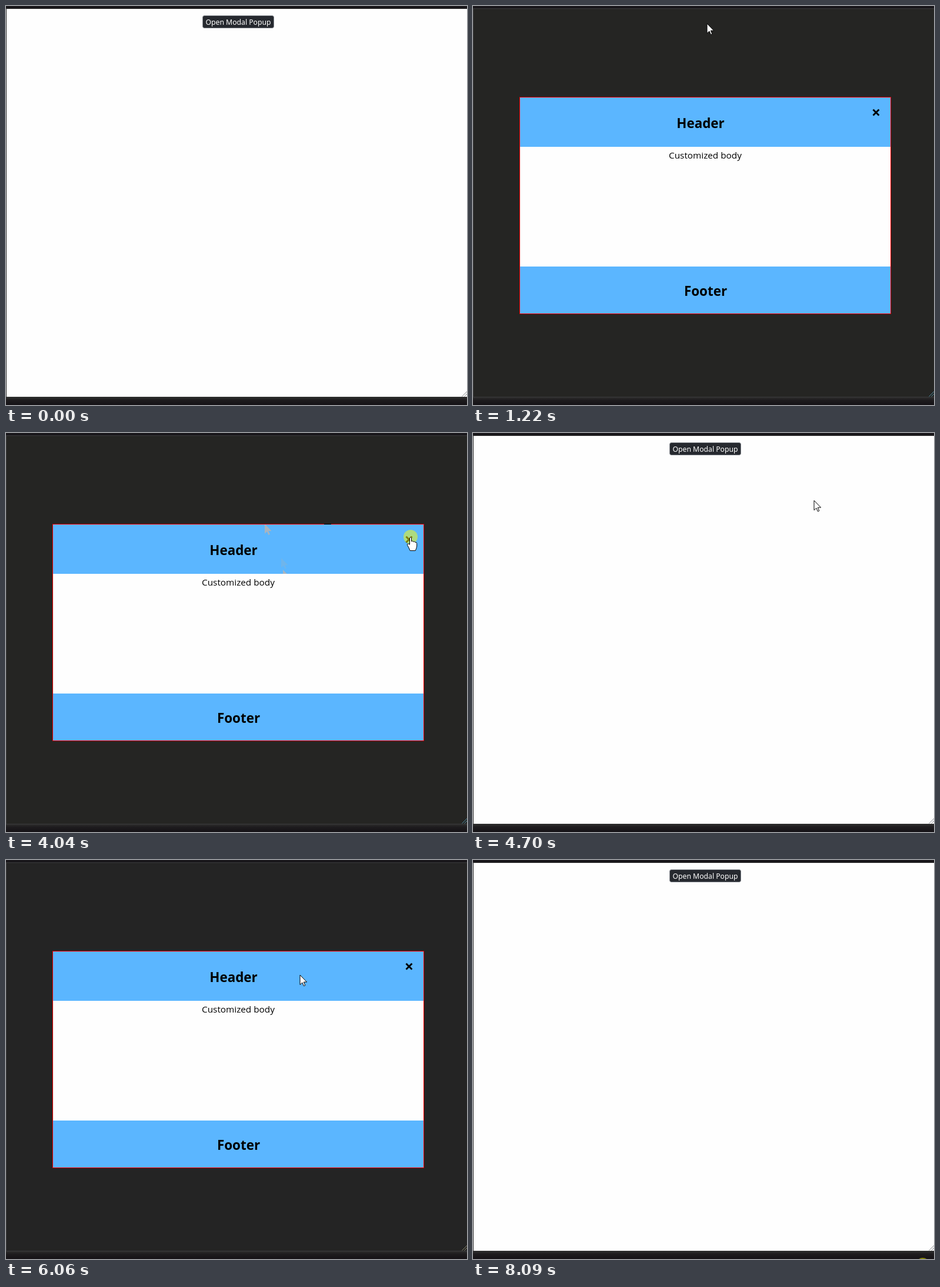
These frames come from a looping animation (784x680 px, 8220 ms). An HTML page:

```html
<!DOCTYPE html>
<html lang="en">
<head>
<meta charset="utf-8">
<title>Modal popup</title>
<style>
  html, body { margin: 0; width: 100%; height: 100%; overflow: hidden; background: #18161a; }
  svg { display: block; width: 784px; height: 680px; }
  text { text-anchor: middle; font-family: "Open Sans", "Noto Sans", sans-serif; }
  .title { font-size: 22.4px; font-weight: 700; }
  .button { font: 500 12.2px "Noto Sans", "Open Sans", sans-serif; fill: #fff; }
</style>
</head>
<body>
<svg viewBox="0 0 784 680">
  <defs>
    <linearGradient id="bar" x2="0" y2="1">
      <stop offset="0" stop-color="#303030"/>
      <stop offset=".4" stop-color="#1e1c1e"/>
      <stop offset="1" stop-color="#151216"/>
    </linearGradient>
    <path id="arrow" d="M0 0V16.5L3.9 12.9 6.4 18.7 8.8 17.7 6.3 12H11.6Z"/>
    <clipPath id="header"><rect x="80" y="156" width="630" height="84"/></clipPath>
  </defs>

  <rect width="784" height="680" fill="#18161a"/>
  <rect y="666" width="784" height="14" fill="url(#bar)"/>

  <g id="page">
    <rect y="4" width="784" height="662" fill="#333"/>
    <rect x="1" y="5" width="783" height="661" fill="#fefefe"/>
    <rect id="button" x="334.5" y="16.5" width="121" height="21" rx="3" stroke="#858990"/>
    <text class="button" x="395" y="32">Open Modal Popup</text>
  </g>

  <g id="modal">
    <rect y="4" width="784" height="663" fill="#3a3a3c"/>
    <rect id="backdrop" x="1" y="5" width="783" height="661"/>
    <rect x="79" y="155" width="632" height="370" fill="#f00"/>
    <rect x="80" y="156" width="630" height="368" fill="#5bb6ff"/>
    <rect x="80" y="240" width="630" height="204" fill="#fefefe"/>
    <g clip-path="url(#header)" fill="#a9b4bf">
      <use id="faintTrail" href="#arrow" x="468" y="213" fill="#6fb5eb"/>
      <g id="trail">
        <use href="#arrow" x="440" y="155"/>
        <use href="#arrow" x="471" y="233"/>
      </g>
      <use id="lateTrail" href="#arrow" x="499" y="144"/>
    </g>
    <path id="dash" d="M541 155.5h12" stroke="#000"/>
    <path id="lateDash" d="M499 155.5h12M544 155.5h4" stroke="#000"/>
    <text class="title" x="387" y="208">Header</text>
    <text x="395" y="260" font-size="15.3">Customized body</text>
    <text class="title" x="395.5" y="494">Footer</text>
    <text x="685.5" y="190.5" font-size="27" font-weight="700">×</text>
  </g>

  <path id="grip" d="M775.5 665.5l9-9M779.5 665.5l5-5" fill="none"/>
  <circle id="click" r="12" fill="#ff0" fill-opacity=".5"/>
  <g id="pointer" fill="#fff" stroke="#000" stroke-linejoin="round">
    <use id="arrowShape" href="#arrow"/>
    <path id="handShape" d="M-1.5 13V1.8Q0-.8 1.5 1.8V7.5Q3.6 6.3 4.7 8.3 6.8 7.3 7.9 9.2 10.5 8.8 10.7 11.5V16Q10 20 8.2 23.5H-.8Q-2.5 19-5.3 14.3-5.9 11-3.4 12Z"/>
  </g>
</svg>

<script>
const LOOP = 8220, STEP = 68;
const el = id => document.getElementById(id);
const show = (id, on) => el(id).setAttribute("visibility", on ? "inherit" : "hidden");
const within = (t, a, b) => t >= a && t < b;

// Each move starts where the last one ended; sway bends the straight line.
const moves = [];
let last = [737, 609];
function move(start, end, to, sway = [0, 0]) {
  moves.push({ start, end, from: last, to, sway });
  last = to;
}
move(200, 830, [398, 30], [-30, 0]);
move(1490, 2310, [421, 202], [-32, 165]);
move(2380, 3090, [399, 80], [-64, 195]);
move(3290, 3900, [688, 177]);
move(4430, 5040, [428, 29]);
move(5180, 6000, [500, 196], [-20, 40]);
move(6060, 6880, [678, 182], [-10, -73]);
move(7410, 7540, [765, 690], [0, 38]);

function pointerAt(t) {
  const { start, end, from, to, sway } = moves.findLast(m => m.start <= t) || moves[0];
  const count = Math.round((end - start) / STEP);
  const raw = Math.min(1, Math.max(0, (t - start) / (end - start)));
  const p = Math.floor(raw * count + 0.1) / count;
  const ease = p * p * (3 - 2 * p);
  return [0, 1].map(i => Math.round(
    from[i] + (to[i] - from[i]) * ease + sway[i] * Math.sin((2 - i) * Math.PI * p)));
}

function draw(t) {
  const [x, y] = pointerAt(t);
  const first = within(t, 1220, 4170), second = within(t, 5180, 7150);
  const open = first || second, atEnd = t >= 8090;
  const hover = !open && t >= 200 && Math.abs(x - 395) < 61 && Math.abs(y - 27) < 12;
  const hand = open && Math.abs(x - 685) < 10 && Math.abs(y - 180) < 14;

  show("page", !open);
  show("modal", open);
  el("button").setAttribute("fill", hover ? "#5a5d65" : "#26292f");
  el("backdrop").setAttribute("fill", first ? "#252523" : "#242424");
  el("grip").setAttribute("stroke", first ? "#4d8ba0" : second ? "#8d8a70" : "#85888c");

  show("faintTrail", first && t >= 2100);
  show("trail", first && t >= 3090);
  show("dash", first && t >= 3700);
  show("lateTrail", second && t >= 6240);
  show("lateDash", second && t >= 6480);

  const offset = hand || atEnd ? 0 : -1;
  show("click", within(t, 1160, 1220) || within(t, 4040, 4170) || within(t, 7010, 7150) || atEnd);
  el("click").setAttribute("transform", `translate(${x + offset} ${y + offset})`);

  show("pointer", within(t, 200, 7540));
  el("pointer").setAttribute("transform", `translate(${x} ${y})`);
  show("arrowShape", !hand);
  show("handShape", hand);
}

const began = performance.now();
function tick() {
  draw((performance.now() - began) % LOOP);
  requestAnimationFrame(tick);
}
tick();
</script>
</body>
</html>
```
